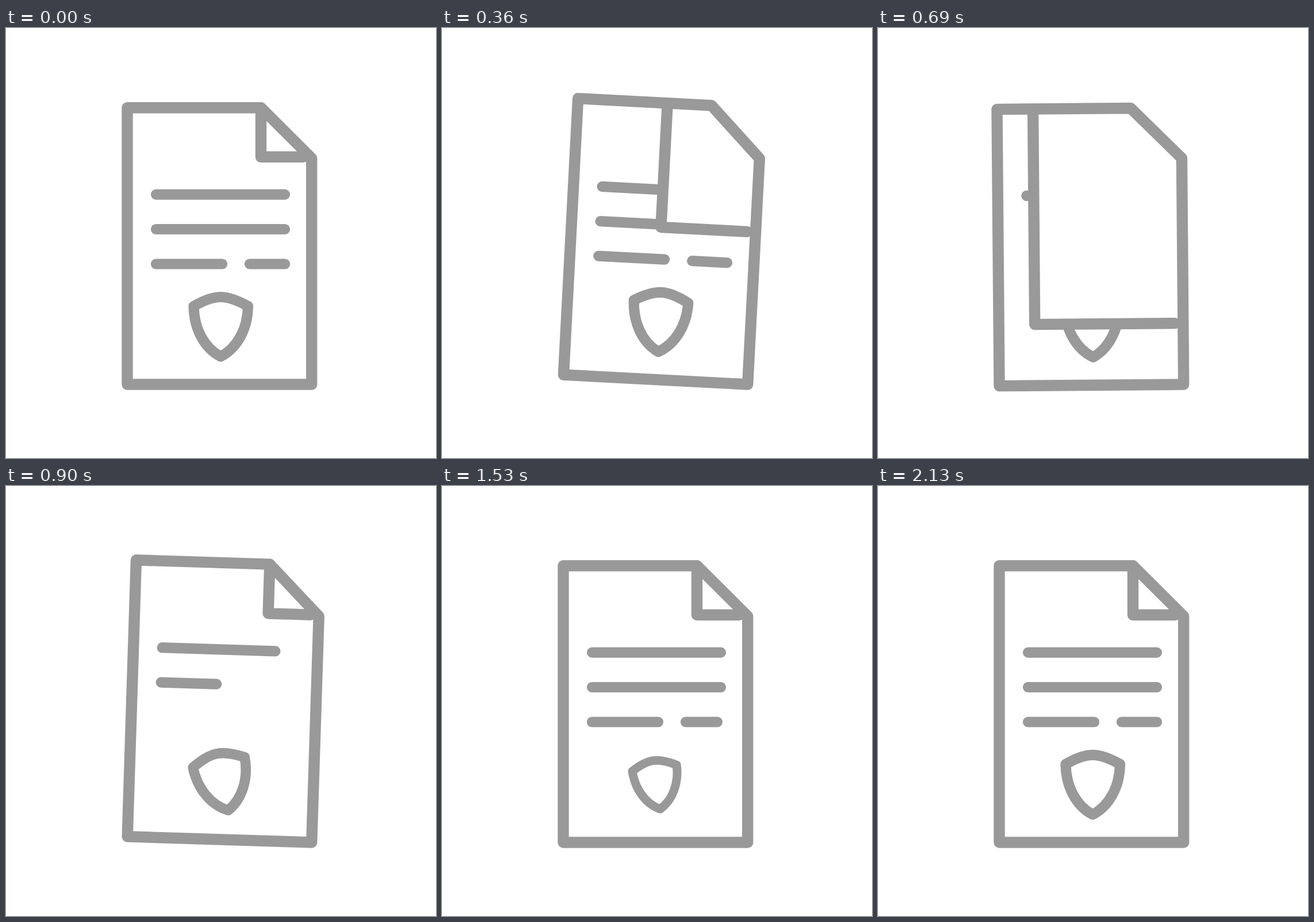
Animation of 748x748 px, one loop 2250 ms. Source, as an HTML page:

```html
<!DOCTYPE html>
<html lang="en">
<head>
<meta charset="utf-8">
<title>Document</title>
<style>
  html, body { margin: 0; height: 100%; overflow: hidden; background: #fff; }
  svg { display: block; width: 100vw; height: 100vh; }
  path { fill: none; stroke: #999; stroke-width: 19.4; stroke-linecap: round; stroke-linejoin: round; }
  #lines path, #shield { stroke-width: 18.2; }
  #cover { fill: #fff; stroke: none; }
</style>
</head>
<body>
<svg viewBox="0 0 748 748">
  <g id="page">
    <g id="lines"></g>
    <path id="shield" d="M326.5 484C342 475 358 468 373.5 468S405 475 421 484C420.5 522 403 556 373.5 571.5C344 556 327 522 326.5 484Z"/>
    <path id="cover"/>
    <path id="fold"/>
    <path d="M211 138.7H443.5L531.7 226.5V620H211Z"/>
  </g>
</svg>
<script>
const LOOP = 2250, STEP = 30, LAST = 2130;
const $ = id => document.getElementById(id);

// Keys are [time, value]; each span eases in and out.
const TILT = [[0, 0], [228, 7], [533, -3], [845, 2], [1143, 0]];
const FOLD = [[212, 0], [597, 1], [870, 0]];
const SPIN = [[630, 0], [935, -13.6], [1240, 16.9], [1545, -8.2], [1850, 0]];
const SIZE = [[630, 1], [935, 0.97], [1240, 1.145], [1545, 0.822], [1850, 1.05], [2150, 1]];

// Each line wipes in again once the fold has hidden the page.
const HIDE = 518;
const LINES = [
  { x: 261, y: 289.6, len: 224, start: 518, dur: 586 },
  { x: 261, y: 350, len: 224, start: 756, dur: 586 },
  { x: 261, y: 410.5, len: 115, start: 994, dur: 456 },
  { x: 424, y: 410.5, len: 61, start: 1251, dur: 408 }
];
for (const line of LINES) {
  line.el = document.createElementNS("http://www.w3.org/2000/svg", "path");
  $("lines").append(line.el);
}

const clamp = p => Math.min(1, Math.max(0, p));
const smooth = p => p * p * (3 - 2 * p);
const easeOut = p => 1 - (1 - p) ** 2;

function valueAt(keys, t) {
  let v = keys[0][1];
  for (let i = 1; i < keys.length; i++) {
    const [t0, v0] = keys[i - 1], [t1, v1] = keys[i];
    if (t >= t0) v = v0 + (v1 - v0) * smooth(clamp((t - t0) / (t1 - t0)));
  }
  return v;
}

function draw(t) {
  $("page").setAttribute("transform", `rotate(${valueAt(TILT, t)} 531.7 620)`);

  for (const { el, x, y, len, start, dur } of LINES) {
    const part = t < HIDE ? 1 : easeOut(clamp((t - start) / dur));
    el.setAttribute("d", part ? `M${x} ${y}h${len * part}` : "");
  }

  $("shield").setAttribute("transform",
    `translate(373.7 520) rotate(${valueAt(SPIN, t)}) scale(${valueAt(SIZE, t)}) translate(-373.7 -520)`);

  // The folded corner travels to the lower left corner of the page.
  const f = valueAt(FOLD, t);
  const x = 443.5 - 232.5 * f, y = 224.3 + 395.7 * f;
  $("cover").setAttribute("d", `M${x} 138.7H443.5L531.7 226.5V${y}H${x}Z`);
  $("fold").setAttribute("d", `M${x} 138.7V${y}H517`);
}

const begin = performance.now();
function tick() {
  const t = (performance.now() - begin) % LOOP;
  draw(Math.min(LAST, Math.floor(t / STEP) * STEP));
  requestAnimationFrame(tick);
}
tick();
</script>
</body>
</html>
```
